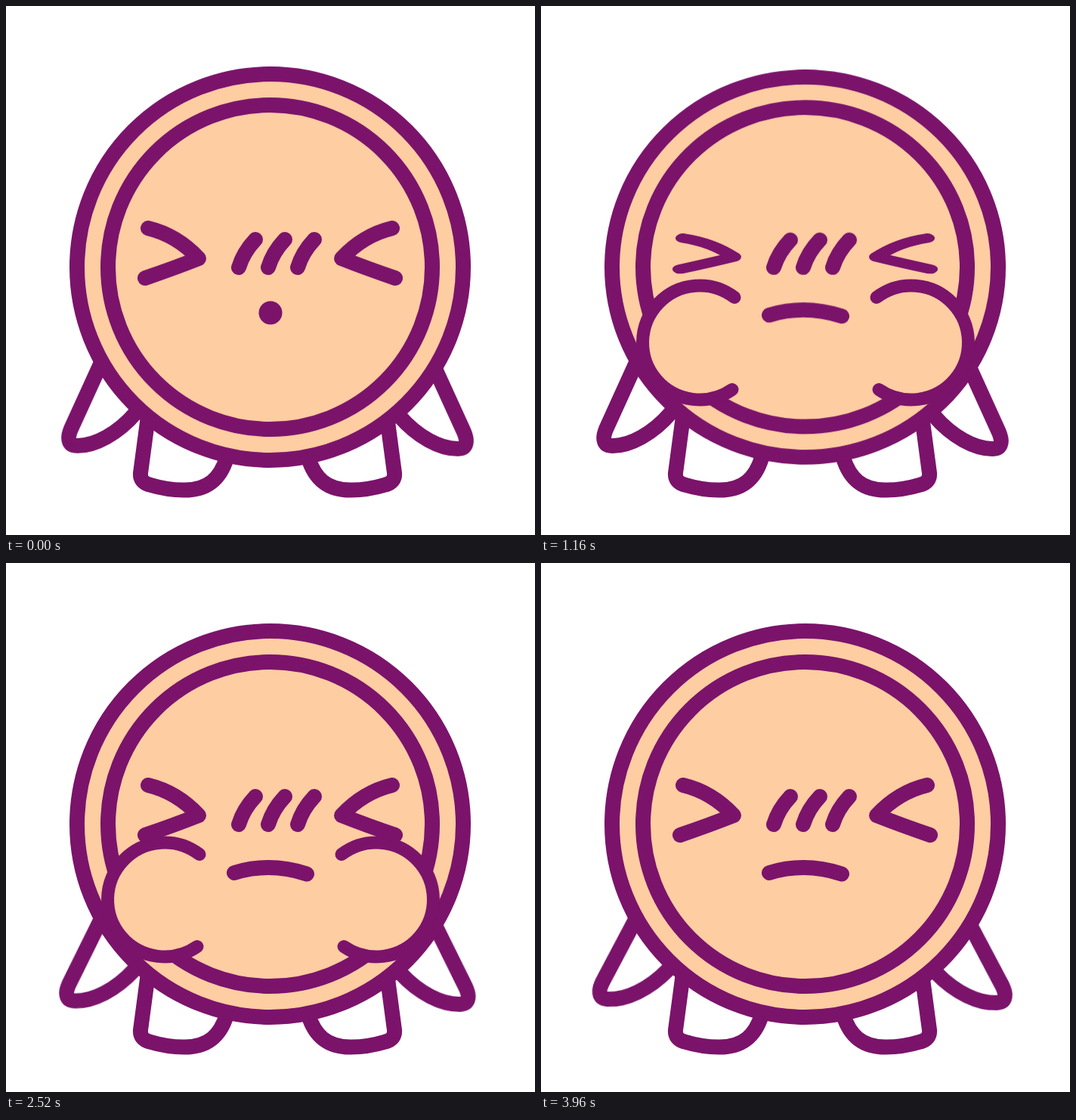
Animation of 700x700 px, one loop 4 s. Source, as an HTML page:

```html
<!DOCTYPE html>
<html lang="en">
<head>
<meta charset="utf-8">
<title>Puffing coin</title>
<style>
  html, body { margin: 0; width: 100%; height: 100%; overflow: hidden; background: #fff; }
  svg { display: block; width: 100vw; height: 100vh; }

  .line { fill: none; stroke: #7b136b; stroke-width: 20; stroke-linecap: round; stroke-linejoin: round; }
  .limb { fill: #fff; }
  .skin { fill: #fecda2; }
  .dot  { fill: #7b136b; }

  .arm, .body, .eyes, .cheeks, .puffed, .open {
    animation: 4s linear infinite;
  }
  .arm    { animation-name: flap; transform-origin: 172px 478px; }
  .arm.r  { transform-origin: 160px 485px; }
  .body   { animation-name: squash; transform-origin: 349.5px 345.5px; }
  .eyes   { animation-name: squeeze; transform-origin: 349.5px 328px; }
  .cheeks { animation-name: inflate; transform-origin: 350px 440px; }
  .cheeks path { stroke-width: 17; vector-effect: non-scaling-stroke; }
  .puffed { animation-name: puffed; animation-timing-function: step-end; }
  .open   { animation-name: open; animation-timing-function: step-end; }
  .frown  { animation: frown 4s step-end infinite; }

  @keyframes flap {
    0%, 18.75%, 62.5%, 81.25%, 100% { transform: rotate(0deg); }
    9.375%, 71.875%, 90.625% { transform: rotate(33deg); }
  }
  @keyframes squash {
    0%, 46.875%, 100% { transform: scaleY(1); }
    21.875% { transform: scaleY(.978); }
  }
  @keyframes squeeze {
    0%, 46.875%, 100% { transform: scaleY(1); }
    21.875% { transform: scaleY(.485); }
  }
  @keyframes inflate {
    0%, 9.375% { transform: scale(.62); }
    28.125%, 100% { transform: scale(1); }
  }
  @keyframes puffed {
    0%, 63.5%, 100% { opacity: 0; }
    9.375% { opacity: 1; }
  }
  @keyframes open {
    0%, 63.5%, 100% { opacity: 1; }
    9.375%, 89% { opacity: 0; }
  }
  @keyframes frown {
    0%, 63.5%, 100% { opacity: 0; }
    9.375%, 89% { opacity: 1; }
  }
</style>
</head>
<body>
<svg viewBox="0 0 700 700">
  <defs>
    <path id="arm" d="M126 472 L86 560 C80 575 84 582 95 582 C118 582 148 566 172 538"/>
    <path id="leg" d="M188 543 L178 618 Q177 630 190 633.5 Q213 640.5 235 640.5 C268 641 284 624 292 598"/>
    <path id="eye" d="M188 294 Q226 303 255 334 Q222 347 184 360"/>
    <path id="mark" d="M308 346 Q314 326 330 309"/>
  </defs>

  <g class="line limb">
    <g class="arm"><use href="#arm"/></g>
    <g transform="matrix(-1 0 0 1 692 4)"><g class="arm r"><use href="#arm"/></g></g>
    <use href="#leg"/>
    <use href="#leg" transform="matrix(-1 0 0 1 692 0)"/>
  </g>

  <g class="body line">
    <circle class="skin" cx="349.5" cy="345.5" r="255.5"/>
    <circle cx="349.5" cy="345.5" r="214.5"/>
  </g>

  <g class="puffed">
    <g class="cheeks line">
      <path id="cheek" class="skin" d="M256 385.6 A75.5 75.5 0 1 0 253 507.6"/>
      <use href="#cheek" transform="matrix(-1 0 0 1 700 0)"/>
    </g>
  </g>

  <g class="body line">
    <g class="eyes">
      <use href="#eye"/>
      <use href="#eye" transform="matrix(-1 0 0 1 699 0)"/>
    </g>
    <use href="#mark"/>
    <use href="#mark" x="39"/>
    <use href="#mark" x="78"/>
    <path class="frown" d="M302 410 Q349 395.5 398 411.5"/>
    <circle class="open dot" cx="350" cy="406" r="15.5" stroke="none"/>
  </g>
</svg>
<style>
  .line .dot { stroke: none; }
</style>
</body>
</html>
```
